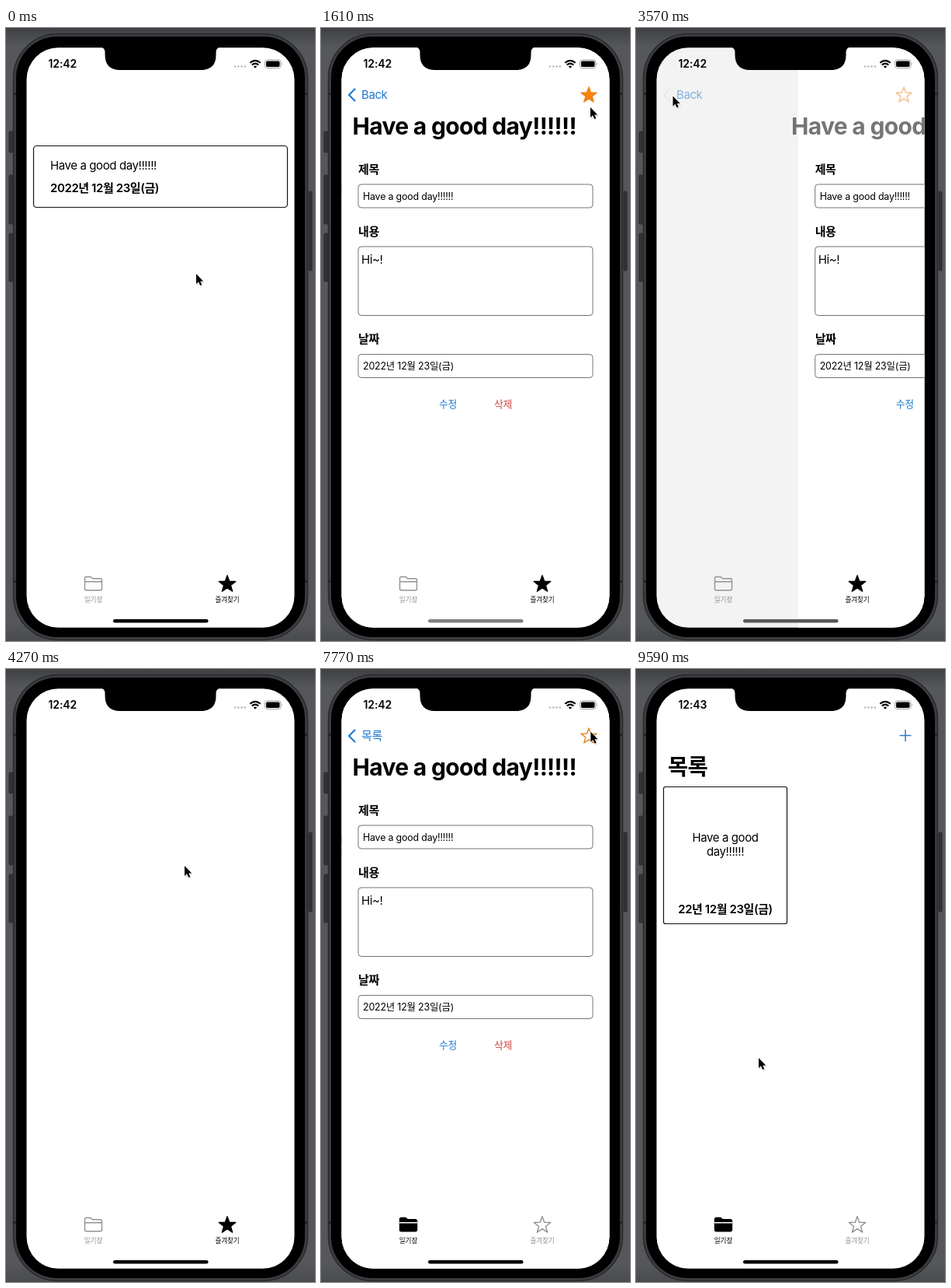
Animation, 398 px wide and 788 px high, one loop 9.66 s. Source, as an HTML page:

```html
<!DOCTYPE html>
<html lang="ko">
<head>
<meta charset="utf-8">
<title>Diary favourites</title>
<style>
html, body { margin: 0; width: 100%; height: 100%; overflow: hidden; background: #55565a; }
svg { display: block; width: 398px; height: 788px; }
text { font-family: Inter, "Noto Sans CJK KR", "Noto Sans CJK", sans-serif; white-space: pre; }
.body { font-size: 15px; letter-spacing: -.4px; }
.small { font-size: 12.4px; letter-spacing: -.18px; }
.action { font-size: 12.8px; letter-spacing: -.3px; }
.bold { font-weight: 600; }
.title { font-size: 30px; font-weight: 700; letter-spacing: -.68px; }
.heading { font-size: 28.5px; font-weight: 700; letter-spacing: -.8px; }
.tab { font-size: 8.6px; font-weight: 500; letter-spacing: -.1px; text-anchor: middle; }
.mid { text-anchor: middle; }
.blue { fill: #1f7ad0; }
.red { fill: #cc463c; }
.box { fill: #fff; stroke: #747474; stroke-width: 1; }
.card { fill: none; stroke: #111; stroke-width: 1.2; }
.round { stroke-linejoin: round; stroke-linecap: round; }
</style>
</head>
<body>
<svg viewBox="0 0 398 788" xmlns="http://www.w3.org/2000/svg">
  <defs>
    <clipPath id="screen"><rect x="26.500" y="25.200" width="345" height="745.600" rx="41"/></clipPath>
    <linearGradient id="metal" x2="0" y2="1">
      <stop offset="0" stop-color="#3f4044"/><stop offset=".03" stop-color="#56575b"/>
      <stop offset=".97" stop-color="#56575b"/><stop offset="1" stop-color="#4a4b4f"/>
    </linearGradient>
  </defs>

  <rect width="398" height="788" fill="url(#metal)"/>
  <g fill="#323336" stroke="#242527" stroke-width=".8">
    <rect x="4" y="133" width="5" height="27" rx="1.5"/>
    <rect x="4" y="189" width="5" height="63" rx="1.5"/>
    <rect x="4" y="264" width="5" height="62" rx="1.5"/>
    <rect x="390" y="210" width="4" height="102" rx="1.5"/>
  </g>
  <rect x="9.5" y="7.5" width="379" height="779" rx="57" fill="#3b3c3f" stroke="#28292b" stroke-width="1.4"/>
  <path d="M10 84.500h4M384 84.500h4M10 711.500h4M384 711.500h4" stroke="#242527" stroke-width="3"/>
  <rect x="13" y="11" width="372" height="772" rx="53"/>

  <g clip-path="url(#screen)">
    <rect x="26" y="25" width="346" height="746" fill="#fff"/>
    <g id="back">
      <g id="favourites">
        <rect class="card" x="35.500" y="151.500" width="327" height="79" rx="4"/>
        <text class="body" x="57" y="182">Have a good day!!!!!!</text>
        <text class="body bold" x="57" y="210.500">2022년 12월 23일(금)</text>
      </g>
      <g id="diary">
        <rect class="card" x="35.500" y="151.500" width="159" height="176" rx="2.500"/>
        <text class="body mid" x="115" y="222">Have a good</text>
        <text class="body mid" x="115" y="240">day!!!!!!</text>
        <text class="body bold mid" x="115" y="314">22년 12월 23일(금)</text>
      </g>
    </g>
    <rect id="dim" x="26" y="25" width="346" height="746"/>

    <g id="page">
      <rect x="26" y="25" width="346" height="746" fill="#fff"/>
      <text class="body bold" x="48" y="186.500">제목</text>
      <rect class="box" x="48" y="201" width="302" height="30" rx="4"/>
      <text class="small" x="54" y="220.500">Have a good day!!!!!!</text>
      <text class="body bold" x="48" y="266.500">내용</text>
      <rect class="box" x="48" y="281" width="302" height="88.500" rx="4"/>
      <text class="body" x="52" y="302.500">Hi~!</text>
      <text class="body bold" x="48" y="404.500">날짜</text>
      <rect class="box" x="48" y="419.500" width="302" height="30" rx="4"/>
      <text class="small" x="54" y="439">2022년 12월 23일(금)</text>
      <text class="action blue" x="152" y="488">수정</text>
      <text class="action red" x="223" y="488">삭제</text>
    </g>

    <text id="title" class="title" x="40.500" y="137">Have a good day!!!!!!</text>
    <path id="chevron" class="round" d="M43.500 78.500l-7.500 7.500 7.500 7.500" fill="none" stroke="#1f7ad0" stroke-width="2.200"/>
    <text id="backText" class="body blue" x="52" y="91">Back</text>
    <text id="backList" class="body blue">목록</text>
    <text id="heading" class="heading">목록</text>
    <path id="mark" class="round" stroke="#e8841c" stroke-width="1.400"/>
    <path id="plus" d="M339.500 85.500h15M347 78v15" stroke="#2f7cc4" stroke-width="1.500"/>

    <g id="folder" class="round" stroke-width="1.400">
      <path d="M101.500 720.800v-13.300q0-2 2-2h5.500l2.500 2.300h10q2 0 2 2v11q0 2-2 2h-18q-2 0-2-2z"/>
      <path id="crease" d="M101.500 711.800h22"/>
    </g>
    <text id="folderText" class="tab" x="112.500" y="738">일기장</text>
    <path id="tabStar" class="round" stroke-width="1.400"/>
    <text id="starText" class="tab" x="285" y="738">즐겨찾기</text>
    <rect id="home" x="138" y="760" width="122.500" height="4.400" rx="2.200"/>

    <text id="clock" x="54.500" y="51.300" font-size="14" font-weight="600" letter-spacing="-.1">12:42</text>
    <g fill="#b9b9b9">
      <circle cx="295" cy="49.500" r="1.300"/><circle cx="299.300" cy="49.500" r="1.300"/>
      <circle cx="303.600" cy="49.500" r="1.300"/><circle cx="307.900" cy="49.500" r="1.300"/>
    </g>
    <g fill="none" stroke="#000" stroke-width="2.100">
      <path d="M314.300 44.800q6.700-5.800 13.400 0M316.700 47.500q4.300-3.800 8.600 0"/>
      <path d="M321 51.800l-2.200-2.400q2.200-1.700 4.400 0z" fill="#000" stroke="none"/>
    </g>
    <rect x="333.500" y="41" width="20.500" height="10.500" rx="3" fill="none" stroke="#999" stroke-width=".9"/>
    <rect x="335" y="42.500" width="17.500" height="7.500" rx="1.700"/>
    <path d="M355 44.700q1.600 1.500 0 3z" fill="#999"/>
  </g>
  <path d="M122 24.500h154q-5.500 1-5.500 7v3q0 19.500-19.500 19.500h-104q-19.500 0-19.500-19.500v-3q0-6-5.500-7z"/>

  <circle id="ring" r="21.500" fill="none" stroke="#333" stroke-width="1.600"/>
  <g id="cursor">
    <path d="M1 1.500v15l3.300-3 2.300 4.700 2.500-1.200-2-4.700h4.400z" opacity=".14"/>
    <path d="M0 0v13.800l3.200-2.900 2.200 5.100 2.400-1-2.200-5h4.200z" stroke="#fff" stroke-width="1.500" paint-order="stroke"/>
  </g>
</svg>
<script>
const LOOP = 9660, WIDTH = 345, SLIDE = 360;
const PUSH = 710, POP = 3460, SWITCH = 5640, POP_DIARY = 8567;
const el = {};
document.querySelectorAll('[id]').forEach(e => el[e.id] = e);

const set = (e, attrs) => { for (const k in attrs) e.setAttribute(k, attrs[k]); };
const clamp = v => Math.min(1, Math.max(0, v));
const mix = (a, b, u) => a + (b - a) * u;
const smooth = u => u * u * (3 - 2 * u);
const show = (e, on) => set(e, { opacity: +on });

// Standard ease curve: cubic-bezier(.25, .1, .25, 1)
function ease(v) {
  if (v <= 0 || v >= 1) return clamp(v);
  const curve = (u, a, b) => 3 * u * (1 - u) ** 2 * a + 3 * u * u * (1 - u) * b + u ** 3;
  let lo = 0, hi = 1;
  for (let i = 0; i < 16; i++) {
    const u = (lo + hi) / 2;
    if (curve(u, .25, .25) < v) lo = u; else hi = u;
  }
  return curve(lo, .1, 1);
}

function starPath(cx, cy, r) {
  let d = '';
  for (let i = 0; i < 10; i++) {
    const a = Math.PI * (i / 5 - .5), k = i % 2 ? r * .41 : r;
    d += (i ? 'L' : 'M') + (cx + k * Math.cos(a)).toFixed(2) + ' ' + (cy + k * Math.sin(a)).toFixed(2);
  }
  return d + 'z';
}
set(el.mark, { d: starPath(345, 86.5, 10.5) });
set(el.tabStar, { d: starPath(285, 715, 11.3) });

// start, end, x, y and an optional bend point
const moves = [
  [70, 520, 215, 200, 222, 260],
  [1020, 1610, 347, 102, 330, 10],
  [1790, 1960, 347.5, 87.5],
  [2450, 3080, 91, 82, 220, 165],
  [3080, 3340, 47.5, 87.5],
  [3860, 4270, 230, 253],
  [4270, 4500, 267, 242],
  [4500, 4830, 236, 228],
  [4840, 5440, 114.5, 715.5],
  [6290, 6740, 373, 74],
  [7640, 8400, 63, 90, 210, 120],
  [8700, 9590, 158, 500]
];
const presses = [[560, 700], [2160, 2310], [3350, 3495], [5450, 5595], [8460, 8560]];

function pointer(t) {
  if (t > 6800 && t < 7600) {
    const a = -.3 - 2 * Math.PI * (t - 6800) / 800;
    return [346 + 28 * Math.cos(a), 82.3 + 28 * Math.sin(a)];
  }
  let x = 245, y = 316;
  for (const [a, b, x1, y1, bx = (x + x1) / 2, by = (y + y1) / 2] of moves) {
    if (t < a) break;
    const u = smooth(clamp((t - a) / (b - a))), v = 1 - u;
    x = v * v * x + 2 * u * v * bx + u * u * x1;
    y = v * v * y + 2 * u * v * by + u * u * y1;
  }
  return [x, y];
}

// How far the detail page covers the list
function cover(t, diary) {
  return diary ? 1 - ease((t - POP_DIARY) / SLIDE)
    : ease((t - PUSH) / SLIDE) - ease((t - POP) / SLIDE);
}

function drawPages(t, diary) {
  const d = cover(t, diary), n = cover(t - 12, diary), q = 1 - n;
  set(el.back, { transform: `translate(${-.3 * WIDTH * d} 0)` });
  show(el.favourites, !diary && t < POP);
  show(el.diary, diary);
  set(el.dim, { opacity: .1 * d });
  set(el.page, { transform: `translate(${WIDTH * (1 - d)} 0)`, opacity: +(d > 0) });

  set(el.title, { transform: `translate(${WIDTH * q} 0)`, opacity: n });
  set(el.chevron, { opacity: clamp(1 - 2 * q) });
  set(el.backText, { opacity: diary ? 0 : n });
  const x = mix(52, 41, q), y = mix(91, 136, q), size = mix(26.5, 51, q);
  const place = w => `translate(${x} ${y}) scale(${size / w})`;
  set(el.backList, { transform: place(26.5), opacity: diary ? n : 0 });
  set(el.heading, { transform: place(51), opacity: diary ? q : 0 });

  const pressed = t >= 2160 && t < 2290;
  set(el.mark, { fill: !diary && t < 2290 ? '#fb8209' : 'none', opacity: pressed ? .5 : n });
  set(el.plus, { opacity: diary ? q : 0 });
}

function drawTabs(t, diary) {
  const grey = '#929292', on = '#000';
  const left = diary ? on : grey, right = diary ? grey : on;
  set(el.folder, { stroke: left, fill: diary ? on : 'none' });
  set(el.crease, { stroke: diary ? '#fff' : grey });
  set(el.folderText, { fill: left });
  set(el.tabStar, { stroke: right, fill: diary ? 'none' : on });
  set(el.starText, { fill: right });
  const faded = clamp((t - 700) / 280) - clamp((t - 3480) / 300);
  const g = Math.round(128 * faded);
  set(el.home, { fill: `rgb(${g},${g},${g})` });
}

function draw(t) {
  const diary = t >= SWITCH;
  drawPages(t, diary);
  drawTabs(t, diary);
  el.clock.textContent = t < 8000 ? '12:42' : '12:43';
  const [x, y] = pointer(t);
  set(el.cursor, { transform: `translate(${x} ${y}) scale(.94)` });
  set(el.ring, { cx: x, cy: y });
  show(el.ring, presses.some(([a, b]) => t >= a && t < b));
}

const begin = performance.now();
function tick() {
  draw((performance.now() - begin) % LOOP);
  requestAnimationFrame(tick);
}
draw(0);
tick();
</script>
</body>
</html>
```
